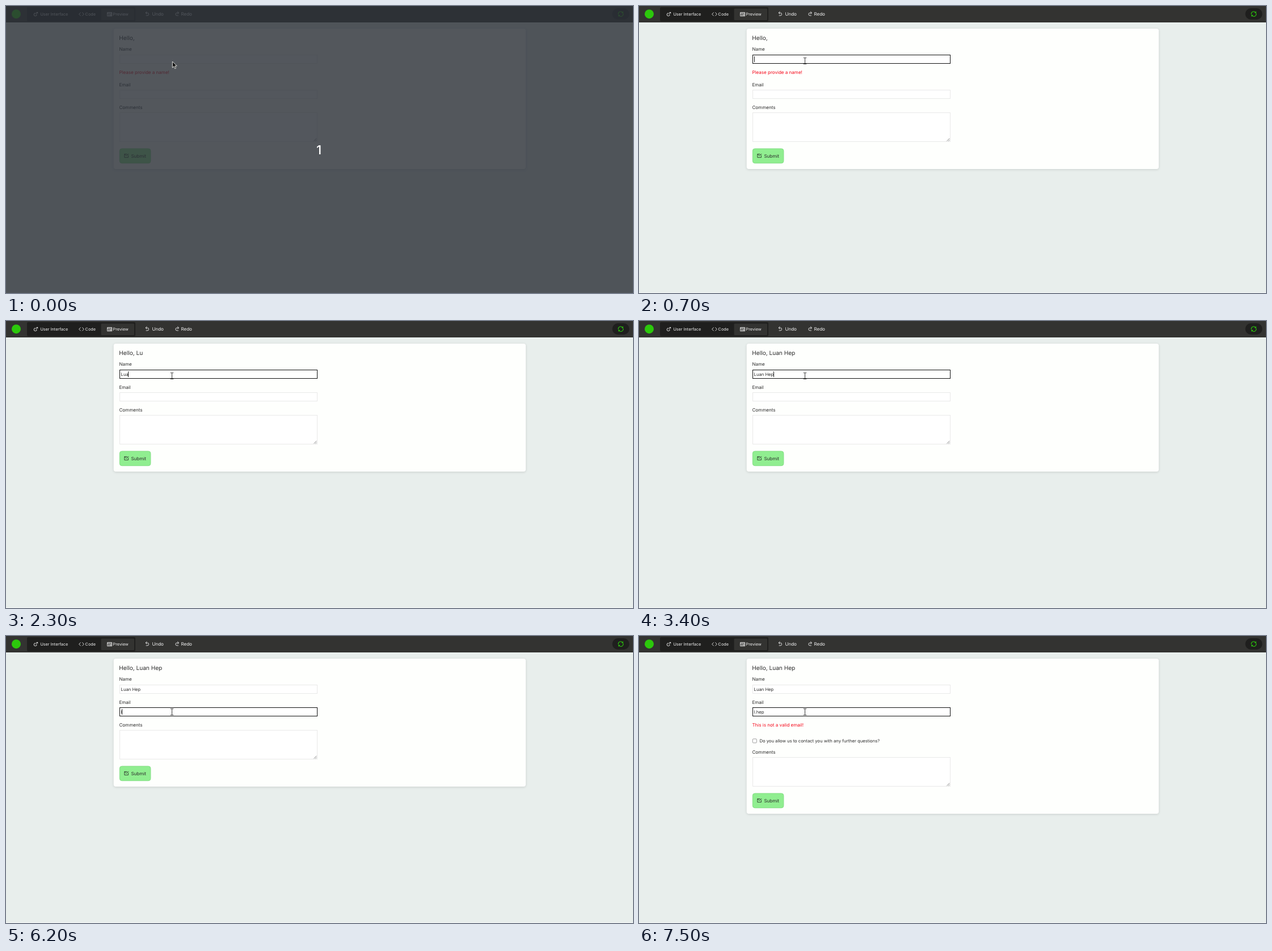
Write an HTML page that moves like this. It is 1105 by 507 pixels and loops after 8 s.

```html
<!DOCTYPE html>
<html lang="en">
<head>
<meta charset="utf-8">
<title>Form preview</title>
<style>
  html, body { margin: 0; width: 100%; height: 100%; overflow: hidden; background: #e8eeec; }
  svg { display: block; width: 100%; height: 100%; }
  text { font: 8.06px Inter, sans-serif; fill: #2b2b2b; white-space: pre; text-rendering: geometricPrecision; }
  .title { font-size: 10.13px; }
  .tab { font-size: 7.25px; fill: #f2f2f2; }
  .tool { fill: #f2f2f2; }
  .value { font-size: 7.67px; }
  .error { fill: #f5081a; }
  .count { font-size: 22px; font-weight: 500; fill: #fff; }
  .icon { fill: none; stroke: #f2f2f2; stroke-width: .9; }
  .box { fill: #fff; stroke: #e9e9e9; }
  .box.focus { stroke: #111; }
  .card { fill: #fefffd; filter: drop-shadow(0 1.5px 2px rgba(0, 0, 0, .13)); }
</style>
</head>
<body>
<svg viewBox="0 0 1105 507">
  <rect width="1105" height="507" fill="#e8eeec"/>
  <rect y="506" width="1105" height="1" fill="#f5f8f7"/>

  <g id="header">
    <rect width="1105" height="29" fill="#333331"/>
    <circle cx="18" cy="14.2" r="8" fill="#2cc80c"/>
    <rect x="37" y="2" width="191" height="25" rx="2" fill="#1f1f1e"/>
    <rect x="167.5" y="4.5" width="58.5" height="20.5" rx="1.5" fill="#333331"/>
    <g class="icon">
      <path d="M52.2 12.7a2.5 2.5 0 1 0 2 2.2M52.4 14.6l3.2-3.3M53.4 11.6l2.3-.5v2"/>
      <path d="M131.6 11.4l-3 3 3 3M134.4 11.4l3 3-3 3"/>
      <path d="M178.6 11.4h8v6.4h-8zM178.6 13.2h8M180.4 15h1.8M180.4 16.4h1.8M183.6 15h1.6v1.4h-1.6z"/>
      <path id="arrow" d="M248.4 9.8l-2.4 2.3 2.4 2.3M246.2 12.1h3a2.4 2.4 0 0 1 0 4.8h-2.5"/>
      <path d="M302.1 9.8l2.4 2.3-2.4 2.3M304.3 12.1h-3a2.4 2.4 0 0 0 0 4.8h2.5"/>
    </g>
    <text class="tab" x="60.4" y="17.3">User Interface</text>
    <text class="tab" x="139.6" y="17.3">Code</text>
    <text class="tab" x="188.6" y="17.3">Preview</text>
    <text class="tool" x="257.4" y="17">Undo</text>
    <text class="tool" x="308.4" y="17">Redo</text>
    <rect x="1068.5" y="4" width="30" height="20" rx="10" fill="#1f1f1e"/>
    <path d="M1079.4 15.2a4.1 4.1 0 0 1 7.2-3.7M1087.5 13a4.1 4.1 0 0 1-7.2 3.7M1087.2 9.8v2.2h-2.2M1079.7 18.4v-2.2h2.2"
      fill="none" stroke="#2cc80c" stroke-width="1.1"/>
  </g>

  <rect id="card" class="card" x="189.7" y="40" width="726.3" rx="4"/>
  <text id="hello" class="title" x="199.3" y="59.8"></text>
  <text x="199.4" y="79.1">Name</text>
  <rect id="nameBox" class="box" x="200.5" y="86.5" width="348" height="15"/>
  <text id="name" class="value" x="202.6" y="96.8"></text>
  <text id="nameError" class="error" x="199.4" y="120">Please provide a name!</text>

  <g id="email">
    <text x="199.4" y="119.5">Email</text>
    <rect id="mailBox" class="box" x="200.5" y="126.5" width="348" height="15"/>
    <text id="mail" class="value" x="202.6" y="136.8"></text>
  </g>

  <g id="mailError">
    <text class="error" x="199.4" y="160">This is not a valid email!</text>
    <rect x="200.3" y="181.8" width="7" height="7" rx="1.3" fill="#fff" stroke="#767676" stroke-width=".7"/>
    <text class="value" x="212.4" y="187.8">Do you allow us to contact you with any further questions?</text>
  </g>

  <g id="rest">
    <text x="199.4" y="159.6">Comments</text>
    <rect class="box" x="200.5" y="166.5" width="348" height="51"/>
    <path d="M542.6 216.6l4.8-4.8M545.4 216.6l2-2" stroke="#555" stroke-width=".7"/>
    <rect x="200.3" y="230" width="54.6" height="25.7" rx="4" fill="#90ee90" stroke="#7fdc80" stroke-width=".9"/>
    <path d="M215.4 241.6v4h-6.6v-6h4.6M208.9 239.8l3.3 3 1.3-1.2M213 240l1.2 1.2 2-2.2"
      fill="none" stroke="#222" stroke-width=".8"/>
    <text x="220.4" y="245.7">Submit</text>
  </g>

  <rect id="caret" width="1" height="10" fill="#222"/>
  <g id="dim">
    <rect width="1105" height="507" fill="#2c3038" opacity=".81"/>
    <text class="count" x="551.5" y="262" text-anchor="middle">1</text>
  </g>
  <path id="beam" d="M-2.5-5.5h2L0-5 .5-5.5h2M0-5V5M-2.5 5.5h2L0 5 .5 5.5h2"
    fill="none" stroke="#222" stroke-width=".9"/>
  <path id="pointer" d="M0 0v11l2.6-2.4 1.7 4 1.9-.8-1.7-3.9h3.4z"
    fill="#111" stroke="#f4f4f0" stroke-width=".9"/>
</svg>

<script>
const LOOP = 8000, LAG = 100;
const NAME = "Luan Hep", MAIL = "l.hep";
const nameKeys = [2000, 2200, 2300, 2700, 2900, 3100, 3200, 3300];
const mailKeys = [6200, 6500, 6700, 6800, 6900];
const mouseY = [[0, 99], [500, 97], [4000, 87], [4100, 93], [4200, 103], [4300, 114], [4400, 124], [4500, 133], [4600, 134]];

const $ = id => document.getElementById(id);
const within = (t, a, b) => t >= a && t < b;
const typed = (word, keys, t) => word.slice(0, keys.filter(k => k <= t).length);
const show = (id, on) => $(id).setAttribute("display", on ? "inline" : "none");
const move = (id, x, y) => $(id).setAttribute("transform", `translate(${x} ${y})`);

function setText(id, value) {
  if ($(id).textContent !== value) $(id).textContent = value;
}

function placeCaret(id, y) {
  const width = $(id).textContent ? $(id).getComputedTextLength() : 0;
  move("caret", Math.max(203, Math.floor(202.4 + width)), y);
}

function drawMouse(t) {
  const y = mouseY.filter(p => p[0] <= t).pop()[1];
  const isArrow = t < 100 || within(t, 4200, 4400);
  show("pointer", isArrow);
  show("beam", !isArrow);
  move("pointer", 293.3, t < 100 ? 98 : y);
  move("beam", t < 500 ? 293 : 292.5, y);
}

function draw(t) {
  const noName = t < 2000, badMail = t >= 6300;
  const nameFocus = within(t, 700, 4500), mailFocus = t >= 4500;
  const shift = noName ? 22 : badMail ? 48 : 0;

  setText("name", typed(NAME, nameKeys, t));
  // the greeting follows the field a moment later, except for the first letter
  setText("hello", "Hello, " + (t < 2100 ? typed(NAME, nameKeys, t) : typed(NAME, nameKeys, t - LAG)));
  setText("mail", typed(MAIL, mailKeys, t));

  $("nameBox").classList.toggle("focus", nameFocus);
  $("mailBox").classList.toggle("focus", mailFocus);
  show("nameError", noName);
  show("mailError", badMail);
  move("email", 0, noName ? 22 : 0);
  move("rest", 0, shift);
  $("card").setAttribute("height", 226 + shift);

  show("caret", within(t, 700, 1300) || within(t, 1900, 4000) || within(t, 4500, 5100) || within(t, 5700, 7500));
  placeCaret(mailFocus ? "mail" : "name", mailFocus ? 129 : 89);
  show("dim", t < 100);
  drawMouse(t);
}

const start = performance.now();
function tick() {
  draw((performance.now() - start) % LOOP);
  requestAnimationFrame(tick);
}
tick();
</script>
</body>
</html>
```
